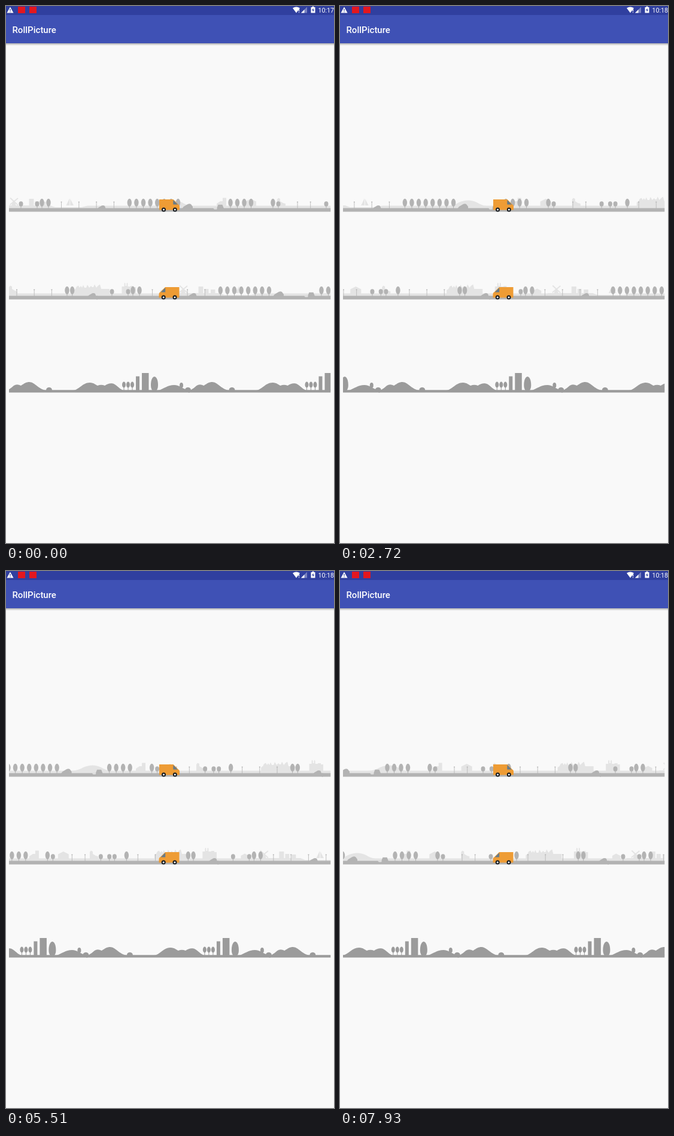
An HTML page for the animation above (7.99 s loop, 548 by 894 pixels).

```html
<!DOCTYPE html>
<html lang="en">
<head>
<meta charset="utf-8">
<title>RollPicture</title>
<style>
  html, body { margin: 0; width: 100%; height: 100%; overflow: hidden; background: #f9f9f9; }
  svg { display: block; width: 548px; height: 894px; }
  text { font-family: Roboto, sans-serif; fill: #fff; }
</style>
</head>
<body>
<svg viewBox="0 0 548 894">
  <defs>
    <clipPath id="strip"><rect x="5" y="300" width="537.3" height="360"/></clipPath>
    <linearGradient id="shade" x2="0" y2="1">
      <stop stop-color="#000" stop-opacity=".3"/>
      <stop offset="1" stop-color="#000" stop-opacity="0"/>
    </linearGradient>

    <g id="skyline" fill="#e4e4e4">
      <path d="M-1 332H74L82 335H126L136 332.5H732V338H-1Z"/>
      <path d="M11.5 325h3l2.5 8h-8z"/>
      <path d="M7 319.5L20 331.5M20 320L6.5 331" stroke="#e4e4e4" stroke-width="1.8"/>
      <path d="M38.5 333V321h8v12zM48.5 333V325h7v8zM59 333V326h7.5v7z"/>
      <path d="M106.3 320V332H100.5zM107.3 321L113 332H107.3z"/>
      <path d="M244 333Q256 332 264 327Q280 320 294 327Q302 332 310 333z"/>
      <path d="M352 333V329L358 325H362V319.5H368V333z"/>
      <path d="M400 333V325.5L409 321L418 325.5V333z"/>
      <path d="M453 333V322L455 319.5L458 321V325L463 328L467 329V333z"/>
      <path d="M561 333V327L564 325L566 321L569 319.5L571 323L573 320L575 323L577 318.5L579 323H582L584 318L587 323L590 320L592 322L594 322L596 317.5L599 323L602 319.5L605 317.5L607 325H621V333z"/>
      <path d="M641.5 333V321H645.5V316L646.5 314.5L647.5 316V320H649.5V316L650.5 314.5L651.5 316V321H656V320H661V322H665V333z"/>
      <path d="M705.5 333V328L712 324.5L719 328V333z"/>
    </g>

    <g id="roadside" fill="#b3b3b3">
      <path d="M-1 336.5H732V342.5H-1z"/>
      <path id="trunks" stroke="#b3b3b3"/>
      <path id="lamps" stroke="#b3b3b3" stroke-width=".8"/>
      <g id="crowns"/>
      <path id="shrub" d="M153 337Q155 334.5 158 333.5Q162 331 165 333L166.5 337z"/>
      <use href="#shrub" x="563"/>
      <path d="M294.500 337Q297 333 301 331.500Q306 328 309 330L312 334V337z"/>
      <path d="M352 337L354.500 330.800H361.500L364 337z"/>
      <path d="M346 336.400H353L352 338.500H348z" fill="#e4e4e4"/>
    </g>

    <g id="hills" fill="#9b9b9b">
      <path d="M-1 639.300H307V643.500H-1z"/>
      <path d="M2 640Q9 636 13 632Q18 628.500 25 632C31 628 34 626 39 626C48 626 54 638 67 640z"/>
      <path d="M112 640C122 639 128 627 140 627C147 627 150 631 153 632Q159 629.500 165 632C170 629 172 628 177 628.300C184 629 188 637 196 640z"/>
      <path d="M255 640C264 637 270 631 281 631C290 631 294 637 305 640z"/>
      <path d="M67 640Q67 635 72 634.700Q77 635 77 640zM299 640Q299 635 304 634.700Q309 635 309 640z"/>
      <path d="M217 640V616.500H223V640zM227 640V611H238.500V640z"/>
      <path d="M242 631C242 622 245 617 248 617S254 622 254 631Q254 637 251.500 640H244.500Q242 637 242 631z"/>
      <path d="M197 634V640M204 634V640M211 634V640M293 633V638" stroke="#9b9b9b"/>
      <ellipse cx="197" cy="630.500" rx="3" ry="5"/>
      <ellipse cx="204" cy="630.500" rx="3" ry="5"/>
      <ellipse cx="211" cy="630.500" rx="3" ry="5"/>
      <ellipse cx="293" cy="631.500" rx="3" ry="4.500"/>
    </g>

    <g id="van">
      <path d="M256 322H279.500L287.500 330Q290 331 290 333.500V339.500H256z" fill="#ee9c35"/>
      <path d="M279.300 323L287 330.500H279.300z" fill="#667b8a"/>
      <g fill="#fff" stroke="#161b20" stroke-width="2">
        <circle cx="263.500" cy="339" r="2.500"/>
        <circle cx="282.300" cy="339" r="2.500"/>
      </g>
    </g>
  </defs>

  <rect y="62" width="548" height="4" fill="url(#shade)"/>
  <rect width="548" height="62" fill="#3f51b5"/>
  <rect width="548" height="15" fill="#303f9f"/>
  <text x="10.500" y="45" font-size="15" font-weight="500">RollPicture</text>

  <path d="M7 1.500L12.500 11.500H1.500z" fill="#fff"/>
  <path d="M7 5V8M7 9V10.300" stroke="#303f9f" stroke-width="1.200"/>
  <path d="M20 1h12v11h-12zM39 1h12v11h-12z" fill="#e3171f"/>
  <path d="M479 3.500Q485 -.5 491 3.500L485 11.500z" fill="#fff"/>
  <path d="M489.500 5V9M489.500 10V11.300" stroke="#fff" stroke-width="1.200"/>
  <path d="M503 1.500V11.500H493z" fill="#fff" opacity=".35"/>
  <path d="M498.500 6V11.500H493z" fill="#fff"/>
  <path d="M509.500 2H511.500V.8H514.500V2H516.500V11.500H509.500z" fill="#fff"/>
  <path d="M513.500 3.500L511 7.300H512.700V10L515 6.300H513.400z" fill="#303f9f"/>
  <text id="clock" x="521.500" y="11" font-size="10.600"></text>

  <g clip-path="url(#strip)">
    <g id="topFar"></g><g id="topNear"></g>
    <g id="midFar"></g><g id="midNear"></g>
    <g id="low"></g>
  </g>
  <use href="#van"/>
  <use href="#van" transform="translate(545.500 146) scale(-1 1)"/>
</svg>
<script>
  const $ = id => document.getElementById(id);
  const row = (start, gap, count) => Array.from({ length: count }, (_, i) => start + gap * i);

  const tallTrees = [60, 71, ...row(206.3, 11.6, 8), ...row(375, 11.5, 4), 446, 578, 681, 689.7];
  const smallTrees = [25, 52, 455, 535, 549.3, 558];
  const lamps = [...row(92.5, 29.3, 4), 487, 508.7, ...row(597, 29.2, 3)];
  const crown = (x, y, rx, ry) => `<ellipse cx="${x}" cy="${y}" rx="${rx}" ry="${ry}"/>`;

  $('trunks').setAttribute('d', [...tallTrees, ...smallTrees].map(x => `M${x} 330V337`).join(''));
  $('crowns').innerHTML = tallTrees.map(x => crown(x, 327.3, 3.7, 6.6)).join('') +
    smallTrees.map(x => crown(x, 329.5, 3.5, 4.2)).join('') +
    lamps.map(x => crown(x, 326.2, 1.2, .7)).join('');
  $('lamps').setAttribute('d', lamps.map(x => `M${x} 326V337`).join(''));

  const PERIOD = 731, HILL_PERIOD = 305.5;
  function tile(id, art, period) {
    $(id).innerHTML = [-1, 0, 1].map(i => `<use href="#${art}" x="${i * period}"/>`).join('');
  }
  for (const place of ['top', 'mid']) {
    tile(place + 'Far', 'skyline', PERIOD);
    tile(place + 'Near', 'roadside', PERIOD);
  }
  tile('low', 'hills', HILL_PERIOD);

  // [first change, last change, number of steps], in ms
  const bursts = [[90, 870, 14], [930, 1720, 14], [1780, 2530, 13], [2590, 3380, 14], [3440, 4230, 15],
    [4300, 5050, 13], [5110, 5900, 14], [5960, 6700, 13], [6760, 7540, 14], [7600, 7930, 7]];
  // [time, distance driven]
  const drive = [[0, 0], [1110, 39], [1900, 68], [3500, 127], [4540, 167], [6390, 237], [7930, 296]];
  const LOOP = 7990;

  function stepTime(t) {
    const burst = bursts.findLast(([start]) => t >= start);
    if (!burst) return 0;
    const [start, end, count] = burst, gap = (end - start) / (count - 1);
    return start + gap * Math.min(count - 1, Math.floor((t - start) / gap + .2));
  }

  function distance(t) {
    const i = Math.max(1, drive.findIndex(([time]) => t <= time));
    const [t0, d0] = drive[i - 1], [t1, d1] = drive[i];
    return d0 + (d1 - d0) * (t - t0) / (t1 - t0);
  }

  const move = (id, x, y = 0) => $(id).setAttribute('transform', `translate(${x} ${y})`);

  function draw(now) {
    const t = now % LOOP, near = distance(stepTime(t)), far = near * 2 / 3;
    move('topNear', -near);
    move('topFar', -far);
    move('midNear', 152 + near, 146);
    move('midFar', 283 + far, 146);
    move('low', far);
    $('clock').textContent = t < 2200 ? '10:17' : '10:18';
    requestAnimationFrame(() => draw(performance.now() - origin));
  }
  const origin = performance.now();
  draw(0);
</script>
</body>
</html>
```
